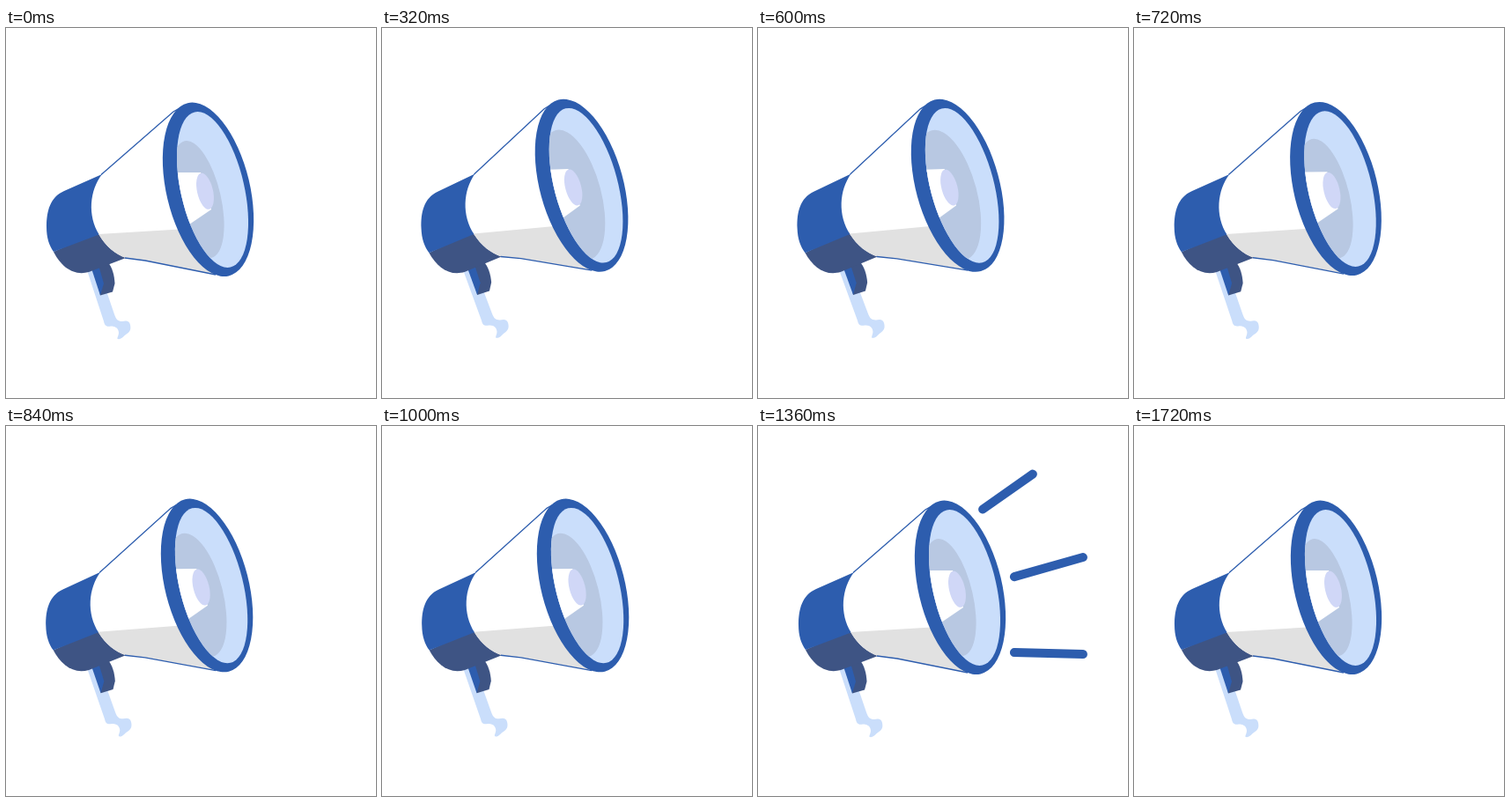
Animation of 420x420 px, one loop 1.76 s. Source, as an HTML page:

```html
<!DOCTYPE html>
<html lang="en">
<head>
<meta charset="utf-8">
<title>Megaphone</title>
<style>
  html, body { margin: 0; width: 100%; height: 100%; overflow: hidden; background: #fff; }
  svg { display: block; width: 100vw; height: 100vh; }
</style>
</head>
<body>
<svg viewBox="0 0 420 420">
  <defs>
    <clipPath id="mouth"><ellipse cx="234.5" cy="183.5" rx="36" ry="90.4" transform="rotate(-13 234.5 183.5)"/></clipPath>
  </defs>
  <g id="horn">
    <path fill="#cadefb" d="M92 275L111 333C112 339 115 339 119 338.500C125 338 128 342 128 346C128 349 126 351 126.500 353C131 354 133 350 136 348C141 345 142 342 141 337C140 332 136 332 132 333C127 333 125 331 123 325L105 272Z"/>
    <path fill="#3e5484" d="M103 270L115 265C121 272 123 281 123.500 290L121 299.500L107 303.500Z"/>
    <path fill="#2d5dae" d="M97 273L105 269L111 290L107 303.500Z"/>
    <path fill="#3e5484" d="M54 254C62 270 76 282 94 277L136 261L120 225Z"/>
    <path fill="#2d5dae" d="M109 166L66 185C50 192 46 208 46 226C46 238 49 247 54 254L120 229Z"/>
    <path fill="#fff" d="M109 166L190 95L212 90L250 275L236 280L158 264L136 261C125 257 113 248 106 235C92 213 95 184 109 166Z"/>
    <path fill="#e1e1e1" d="M105 234L205 228L240 280L158 264L136 261C124 257 113 247 105 234Z"/>
    <path fill="none" stroke="#2d5dae" stroke-width="1.3" d="M108 166.500L190 95L197 91M135 261L158 264L238 280"/>
    <ellipse fill="#2d5dae" cx="229.5" cy="183.3" rx="47.4" ry="100.8" transform="rotate(-13.35 229.5 183.3)"/>
    <g clip-path="url(#mouth)">
      <path fill="#cadefb" d="M180 80H290V290H180Z"/>
      <ellipse id="throat" fill="#b8c8e2" transform="rotate(-13 218 194.5)"/>
      <g id="speaker">
        <path fill="#fff" d="M180 164H221L233 206L208 223L180 242Z"/>
        <ellipse fill="#d0d7f7" cx="226" cy="185.3" rx="9" ry="21" transform="rotate(-13 226 185.3)"/>
      </g>
    </g>
  </g>
  <g id="rays" stroke="#2d5dae" stroke-width="10" stroke-linecap="round"></g>
</svg>
<script>
const LOOP = 1760, STEP = 40;
const PULSES = [160, 470, 760, 1080];
const RAYS = [[253, 96, 317, 51], [288, 172, 376, 147], [288, 257, 376, 259.2]];

const byId = id => document.getElementById(id);
const mix = (a, b, k) => a + (b - a) * k;
const progress = (t, from, to) => Math.min(1, Math.max(0, (t - from) / (to - from)));

const lines = RAYS.map(() =>
  byId('rays').appendChild(document.createElementNS('http://www.w3.org/2000/svg', 'line')));

function pulse(t) {
  const i = PULSES.findIndex((start, n) => t >= start && t < PULSES[n + 1]);
  return i < 0 ? 0 : Math.sin(Math.PI * progress(t, PULSES[i], PULSES[i + 1])) ** 2;
}

function draw(t) {
  const k = pulse(t);
  byId('horn').setAttribute('transform', `rotate(${-1.9 * k} 89 270)`);
  byId('speaker').setAttribute('transform', `translate(${-6 * k} 0)`);
  const throat = byId('throat');
  throat.setAttribute('cx', 218 + 1.5 * k);
  throat.setAttribute('cy', 194.5 - 0.5 * k);
  throat.setAttribute('rx', mix(26, 32, k));
  throat.setAttribute('ry', mix(68, 76, k));

  // Each ray shoots out, then its tail catches up with its tip.
  const tip = 1 - (1 - progress(t, 1062, 1478)) ** 2;
  const tail = progress(t, 1280, 1720) ** 2;
  byId('rays').setAttribute('visibility', tip > tail ? 'visible' : 'hidden');
  RAYS.forEach(([x1, y1, x2, y2], i) => {
    const ends = { x1: mix(x1, x2, tail), y1: mix(y1, y2, tail), x2: mix(x1, x2, tip), y2: mix(y1, y2, tip) };
    for (const name in ends) lines[i].setAttribute(name, ends[name]);
  });
}

const begin = performance.now();
function tick() {
  const t = (performance.now() - begin) % LOOP;
  draw(Math.floor(t / STEP) * STEP);
  requestAnimationFrame(tick);
}
tick();
</script>
</body>
</html>
```
